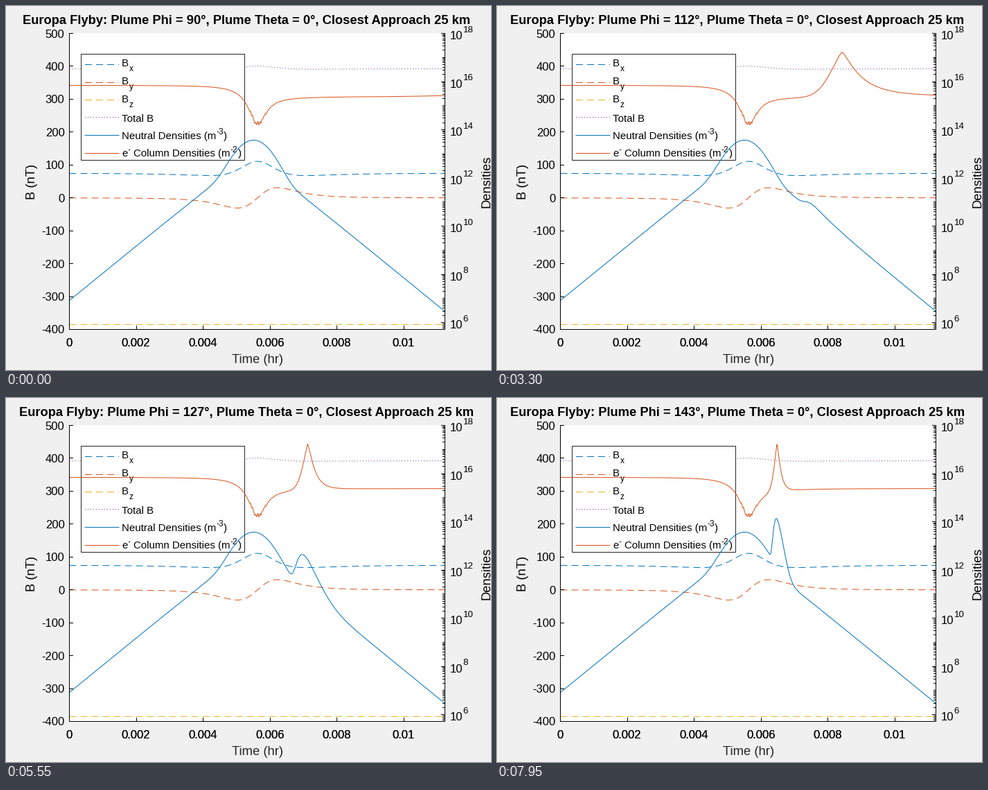
A matplotlib script for the animation above (8000 ms loop, 700 by 525 pixels).

```python
import numpy as np
import matplotlib.pyplot as plt
from matplotlib.animation import FuncAnimation
from matplotlib.patches import Rectangle

W, H = 700, 525
LEFT, RIGHT, TOP, BOTTOM = 91.5, 633.5, 39.5, 466.5
PX = 0.72  # points per pixel at 100 dpi
DECADE = 34.77  # pixels per power of ten on the right axis
CENTER = 363  # closest approach, px
BLUE, ORANGE, YELLOW, PURPLE = "#0072BD", "#D95319", "#EDB120", "#7E2F8E"
DASH, DOT = (0, (10, 6)), (0, (1, 3))

plt.rcParams["font.family"] = "Liberation Sans"
plt.rcParams["path.snap"] = False
fig = plt.figure(figsize=(W / 100, H / 100), dpi=100, facecolor="#f0f0f0")
ax = fig.add_axes([0, 0, 1, 1])
ax.set(xlim=(0, W), ylim=(H, 0))
ax.axis("off")


def line(x, y, color="black", style="-", z=2):
    return ax.plot(x, y, color=color, ls=style, lw=PX, zorder=z)[0]


def label(x, y, s, size=16.67, ha="left", **kw):
    return ax.text(x, y, s, fontsize=size * PX, ha=ha, va="baseline",
                   rotation_mode="anchor", zorder=4, **kw)


def tick(y, x0, x1):
    y = np.floor(y) + 0.5
    line([x0, x1], [y, y], z=6)


def field_y(b):
    return TOP + (500 - b) * (BOTTOM - TOP) / 900


def density_y(exponent):
    return TOP + (18 - exponent) * DECADE


def add_densities(*curves):
    """Sum densities that are given as heights on the log axis."""
    return -DECADE * np.log10(sum(10 ** (-y / DECADE) for y in curves))


def draw_axes():
    ax.add_patch(Rectangle((LEFT, TOP), RIGHT - LEFT, BOTTOM - TOP, fc="white", ec="none", zorder=0))
    line([LEFT, LEFT], [TOP, BOTTOM], z=6)
    line([RIGHT, RIGHT], [TOP, BOTTOM], z=6)
    line([LEFT, RIGHT], [BOTTOM, BOTTOM], z=6)
    for b in range(-400, 501, 100):
        tick(field_y(b), LEFT, LEFT + 5)
        label(84.5, field_y(b) + 6, str(b), ha="right")
    for k in range(6):
        x = LEFT + 96.6 * k
        line([np.floor(x) + 0.5] * 2, [BOTTOM, BOTTOM - 5], z=6)
        for _ in range(2):  # both y axes print the same time labels
            label(x - 0.5, 491, f"{0.002 * k:g}", ha="center")
    for e in range(6, 19, 2):
        y = density_y(e)
        tick(y, RIGHT - 5, RIGHT)
        label(641, y + 8.5, "10")
        label(659.5, y - 2, str(e), 13.3)
    for e in range(5, 18):
        for m in range(1, 10):
            y = density_y(e + np.log10(m))
            if y < BOTTOM:
                tick(y, RIGHT - 3, RIGHT)
    label(363, 515, "Time (hr)", 18.33, "center", color="#262626")
    label(41.5, 253, "B (nT)", 18.33, "center", rotation=90)
    label(699, 253, "Densities", 18.33, "center", rotation=90)


def draw_legend():
    ax.add_patch(Rectangle((108.5, 69.5), 236, 153, fc="white", ec="#262626", lw=PX, zorder=3))
    styles = [(BLUE, DASH), (ORANGE, DASH), (YELLOW, DASH), (PURPLE, DOT), (BLUE, "-"), (ORANGE, "-")]
    for row, (color, style) in enumerate(styles):
        y = 84.5 + round(25.5 * row)
        line([114, 163], [y, y], color, style, z=4)
    for row, axis in enumerate("xyz"):
        y = 87 + 26 * row
        label(167, y, "B", 15)
        label(177.5, y + 7, axis, 12)
    label(167, 167, "Total B", 15)
    label(167, 192, "Neutral Densities (m", 15)
    label(303, 185, "-3", 12)
    label(314, 192, ")", 15)
    label(167, 217, "e", 15)
    label(175.5, 211, "-", 12)
    label(183.5, 217, "Column Densities (m", 15)
    label(323, 211, "-2", 12)
    label(334.5, 217, ")", 15)


def draw_fields(x):
    """Background field plus an induced dipole at the closest approach."""
    u = (x - CENTER) / 58
    falloff = (1 + u * u) ** -2.5
    bx = 75 + 36 * (1 - 2 * u * u) * falloff
    by = 108 * u * falloff
    bz = np.full_like(x, -385)
    line(x, field_y(bx), BLUE, DASH)
    line(x, field_y(by), ORANGE, DASH)
    line(x, field_y(bz), YELLOW, DASH)
    line(x, field_y(np.sqrt(bx**2 + by**2 + bz**2)), PURPLE, DOT)


x = np.linspace(LEFT, RIGHT, 1085)

# Exponential atmosphere along a straight pass, with a gaussian cloud in the middle.
atmosphere = 210.2 + 0.818 * np.hypot(x - 352.8, 22)
cloud = 195 + 0.027 * (x - 357.5) ** 2

# A step between two levels with a ragged dip at the closest approach.
offset = x - CENTER
dip = 48 / (1 + (offset / 15.5) ** 2)
ragged = np.repeat(np.random.default_rng(4).uniform(-2.2, 2.2, len(x) // 3 + 1), 3)[:len(x)]
column_base = (np.minimum(122.4 + 8.1 * np.tanh(offset / 30) + dip, 169)
               + ragged * np.exp(-(offset / 14) ** 4))


def neutral(phi):
    """The plume's own peak climbs and narrows as it swings inward."""
    q = 143 - phi
    d = x - (403 + 1.52 * q)
    peak = 174 + 2.55 * q + 0.045 * q**2
    sharpness = 0.07 + 0.55 * np.exp(-q / 7)
    flank = np.where(d < 0, 1.8, 1 / np.hypot(1, d / min(16, 8 + q)))
    return add_densities(atmosphere, cloud, peak + sharpness * d**2 * flank)


def column(phi):
    """Peak where the line of sight points along the plume."""
    sight = np.degrees(np.arctan2(54.6, offset))
    gain = np.exp(-(np.abs(sight - (phi - 90)) / 4.1) ** 1.3)
    return column_base + (66.5 - column_base) * gain


draw_axes()
draw_fields(x)
draw_legend()
title = label(347, 26, "", 18.33, "center", weight="bold")
neutral_line = line(x, neutral(90), BLUE, z=5)
column_line = line(x, column(90), ORANGE, z=5)


def update(frame):
    phi = 90 + frame // 3
    title.set_text(f"Europa Flyby: Plume Phi = {phi}°, Plume Theta = 0°, Closest Approach 25 km")
    neutral_line.set_ydata(neutral(phi))
    column_line.set_ydata(column(phi))
    return title, neutral_line, column_line


anim = FuncAnimation(fig, update, frames=160, interval=50, repeat=True, repeat_delay=0)
plt.show()
```
